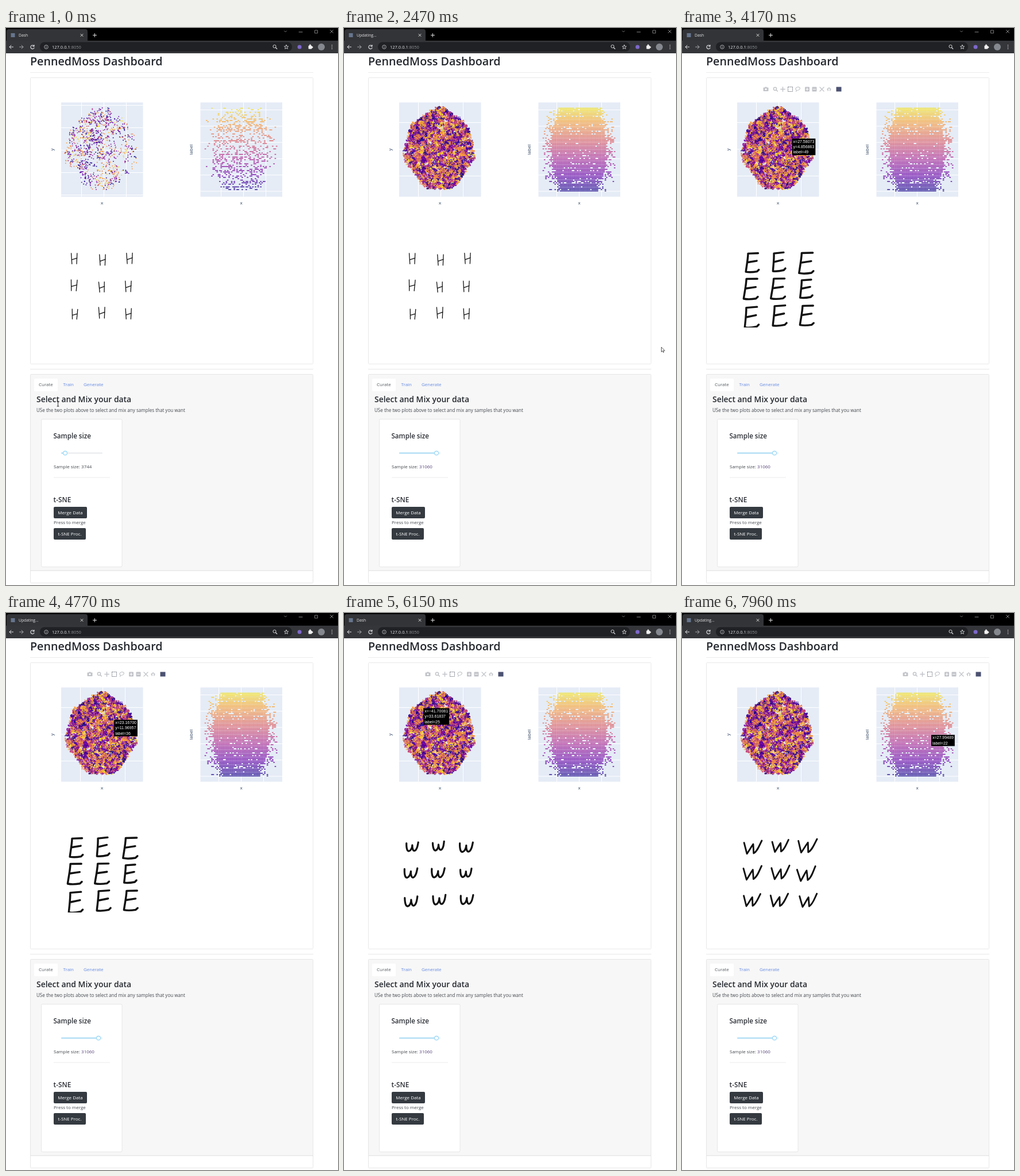
An HTML page with a canvas that plays this animation: 578 px wide and 969 px high, repeating every 8000 ms.

```html
<!DOCTYPE html>
<html lang="en">
<head>
<meta charset="utf-8">
<title>Dashboard</title>
<style>
  html, body { margin: 0; width: 100%; height: 100%; overflow: hidden; background: #fff; }
  canvas { display: block; }
</style>
</head>
<body>
<canvas id="stage" width="578" height="969"></canvas>
<script>
const W = 578, H = 969, LOOP = 8000;
const ctx = document.getElementById('stage').getContext('2d');
const UI = '"Open Sans", "Noto Sans", sans-serif';
const INK = '#30343b', AXIS = '#2a3f5f';

// ---------- helpers ----------
function seeded(seed) {
  return () => {
    seed = (seed + 0x6D2B79F5) | 0;
    let v = Math.imul(seed ^ (seed >>> 15), 1 | seed);
    v = (v + Math.imul(v ^ (v >>> 7), 61 | v)) ^ v;
    return ((v ^ (v >>> 14)) >>> 0) / 4294967296;
  };
}
const mix = (a, b, u) => a + (b - a) * u;
const smooth = u => u * u * (3 - 2 * u);
const latest = (list, t) => list.filter(e => e[0] <= t).pop();

// Values of a keyed track [time, ...values]; `ease` maps the progress between two keys.
function track(keys, t, ease) {
  const next = keys.findIndex(k => k[0] > t);
  if (next < 0) return keys[keys.length - 1].slice(1);
  const a = keys[next - 1], b = keys[next], u = ease((t - a[0]) / (b[0] - a[0]));
  return a.slice(1).map((v, i) => mix(v, b[i + 1], u));
}

const PLASMA = ['0d0887', '6a00a8', 'b12a90', 'e16462', 'fca636', 'f0f921']
  .map(h => [0, 2, 4].map(i => parseInt(h.slice(i, i + 2), 16)));
function plasma(v) {
  const p = Math.min(Math.max(v, 0), 0.9999) * (PLASMA.length - 1), i = Math.floor(p);
  return `rgb(${PLASMA[i].map((c, k) => Math.round(mix(c, PLASMA[i + 1][k], p - i)))})`;
}
function layer(draw) {
  const c = document.createElement('canvas');
  c.width = W; c.height = H;
  draw(c.getContext('2d'));
  return c;
}
function rect(g, x, y, w, h, fill, stroke, r = 0) {
  g.beginPath();
  g.roundRect(x, y, w, h, r);
  if (fill) { g.fillStyle = fill; g.fill(); }
  if (stroke) { g.strokeStyle = stroke; g.lineWidth = 1; g.stroke(); }
}
function disc(g, x, y, r, fill, stroke, width = 1) {
  g.beginPath();
  g.arc(x, y, r, 0, 7);
  if (fill) { g.fillStyle = fill; g.fill(); }
  if (stroke) { g.strokeStyle = stroke; g.lineWidth = width; g.stroke(); }
}
function path(g, d, x, y, color, width = 1, fill) {
  const shape = new Path2D(d);
  g.save();
  g.translate(x, y);
  g.lineCap = g.lineJoin = 'round';
  if (fill) { g.fillStyle = fill; g.fill(shape); }
  g.strokeStyle = color;
  g.lineWidth = width;
  g.stroke(shape);
  g.restore();
}
function text(g, str, x, y, size, color = INK, weight = 400, align = 'left') {
  g.font = `${weight} ${size}px ${UI}`;
  g.textAlign = align;
  g.fillStyle = color;
  g.fillText(str, x, y);
  return x + g.measureText(str).width;
}
function verticalText(g, str, x, y) {
  g.save();
  g.translate(x, y);
  g.rotate(-Math.PI / 2);
  text(g, str, 0, 0, 8, AXIS, 400, 'center');
  g.restore();
}
function button(g, label, y, w) {
  rect(g, 83, y, w, 20, '#343a40', null, 2);
  text(g, label, 83 + w / 2, y + 13, 8, '#fff', 400, 'center');
}

// ---------- static page ----------
function drawBrowser(g) {
  rect(g, 0, 0, W, 23, '#000');
  rect(g, 1, 2, 141, 24, '#333437', null, 4);
  rect(g, 0, 22, W, 22, '#35363a');
  rect(g, 59, 24.5, 439, 16.5, '#202124', null, 8);
  rect(g, 8.5, 9, 7, 7, '#66758c');
  path(g, 'M-2,-2L2,2M2,-2L-2,2', 132, 12.5, '#ddd');
  path(g, 'M-3,0H3M0,-3V3', 154.5, 12.5, '#ddd');
  path(g, 'M-2,-1L0,1L2,-1', 486.5, 6, '#777');
  path(g, 'M-3,0H3', 513, 7, '#888');
  rect(g, 537.5, 4, 5, 5, null, '#777');
  path(g, 'M-2.5,-2.5L2.5,2.5M2.5,-2.5L-2.5,2.5', 567, 6, '#888');
  path(g, 'M3.5,0H-3M0,-3L-3,0L0,3', 9, 33, '#e4e5e7');
  path(g, 'M-3.5,0H3M0,-3L3,0L0,3', 27, 33, '#a5a6a9');
  path(g, 'M2.5,-2A3.2,3.2 0 1 0 3,1.5M3,-3.5V-1H.5', 46, 33, '#e4e5e7', 1.1);
  disc(g, 70, 33, 3.3, null, '#b4b7bb', .9);
  path(g, 'M0,0V1.5M0,-1.6V-1.5', 70, 33, '#b4b7bb', .9);
  const hostEnd = text(g, '127.0.0.1', 80, 35.8, 7.5, '#e8eaed');
  text(g, ':8050', hostEnd, 35.8, 7.5, '#8f9398');
  disc(g, 467.5, 32, 2.6, null, '#d2d3d5');
  path(g, 'M0,0L2,2', 469.7, 34.2, '#d2d3d5', 1.3);
  path(g, 'M0,-3.6L1,-1.2L3.6,-1L1.6,.7L2.3,3.3L0,1.9L-2.3,3.3L-1.6,.7L-3.6,-1L-1,-1.2Z', 488, 33, '#d2d3d5', .9);
  disc(g, 511, 33, 3.5, '#7d68c9');
  rect(g, 526.5, 30.5, 6, 6, '#f1f1f1', null, 1);
  disc(g, 529.5, 30, 1.4, '#f1f1f1');
  disc(g, 533, 33.5, 1.4, '#f1f1f1');
  disc(g, 549, 33, 6, '#85898f');
  [-3, 0, 3].forEach(d => disc(g, 567.5, 33 + d, .8, '#dcdcdc'));
}

function drawPage(g) {
  rect(g, 0, 0, W, H, '#fff');
  drawBrowser(g);
  text(g, 'PennedMoss Dashboard', 42, 65, 19.7, '#24282e', 600);
  rect(g, 42, 77, 493, 1, '#ececec');
  rect(g, 42.5, 86.5, 492, 498, '#fff', '#e9e9e9', 1);
  rect(g, 42, 593, 493, 1, '#e8e8e8');

  rect(g, 42.5, 602.5, 492, 363, '#fff', '#e6e6e6', 1);
  rect(g, 43, 603, 491, 341, '#f7f7f7');
  rect(g, 43, 943.5, 491, 1, '#dedede');
  rect(g, 49, 610, 41, 22, '#fff', null, 2);
  text(g, 'Curate', 57, 623.3, 8, '#555b62');
  text(g, 'Train', 99.5, 623.3, 8, '#6389e2');
  text(g, 'Generate', 135, 623.3, 8, '#6389e2');
  text(g, 'Select and Mix your data', 53, 651, 13.9, '#24282e', 600);
  text(g, 'USe the two plots above to select and mix any samples that you want', 53, 668, 8.05, '#43484e');

  rect(g, 61.5, 680.5, 140.5, 257, '#fff', '#e6e6e6', 2);
  text(g, 'Sample size', 82.5, 714, 11.6, '#2a2e34', 600);
  rect(g, 83, 781.5, 98, 1, '#ececec');
  text(g, 't-SNE', 82.5, 824.5, 11.8, '#2a2e34', 600);
  button(g, 'Merge Data', 833, 58);
  text(g, 'Press to merge', 83, 862.8, 8, '#43484e');
  button(g, 't-SNE Proc.', 870, 56);

  text(g, 'x', 167, 306.5, 8, AXIS, 400, 'center');
  text(g, 'x', 409.5, 306.5, 8, AXIS, 400, 'center');
  verticalText(g, 'y', 83, 211.5);
  verticalText(g, 'label', 325, 211.5);
}

// ---------- plots ----------
function plotArea(g, x, column, row, pitch) {
  rect(g, x, 129.5, 142.5, 164, '#e5ecf6');
  for (let c = column; c < x + 142; c += 39) rect(g, c, 129.5, 1, 164, '#fff');
  for (let r = row; r < 293; r += pitch) rect(g, x, r, 142.5, 1, '#fff');
}
function blobPoint(rnd) {
  const a = rnd() * Math.PI * 2, c = Math.cos(a), s = Math.sin(a);
  const edge = (Math.abs(c) ** 1.7 + Math.abs(s) ** 1.7) ** (-1 / 1.7);
  const r = Math.sqrt(rnd()) * edge * (1 + .04 * Math.sin(7 * a));
  return [166 + r * 61 * c, 211 + r * 71 * s];
}
function randomShade(rnd) {
  const u = rnd();
  if (u < .43) return rnd() * .36;
  if (u < .56) return .4 + rnd() * .22;
  return u < .87 ? .66 + rnd() * .14 : .84 + rnd() * .12;
}
function drawEmbedding(g, dense) {
  const rnd = seeded(dense ? 91 : 17);
  const clusters = dense ? 2300 : 430, size = dense ? 7 : 3, spread = dense ? 5 : 9;
  for (let i = 0; i < clusters; i++) {
    const [x, y] = blobPoint(rnd);
    const inBand = Math.abs(x - 210 + y * .28) < 14;
    if (!dense && !inBand && x > 165 && rnd() < .35) continue;
    const shade = !dense && inBand && rnd() < .6 ? rnd() * .3 : randomShade(rnd);
    g.fillStyle = plasma(shade);
    for (let k = 0; k < size; k++) {
      g.beginPath();
      g.arc(x + (rnd() - .5) * spread, y + (rnd() - .5) * spread, 1, 0, 7);
      g.fill();
    }
  }
}
function drawLabels(g, dense) {
  const rnd = seeded(dense ? 5 : 23), rows = 62;
  for (let i = 0; i < rows; i++) {
    const y = 283.5 - i * 2.36, weight = rnd();
    const core = 27 + 18 * Math.sin(i / rows * Math.PI) + rnd() * 7;
    g.fillStyle = plasma(.03 + i / rows * .93);
    for (let x = 347; x < 473; x += 2.3) {
      const away = Math.abs(x - 409) / core;
      const full = away < 1 ? .72 + weight * .6 : .75 * (1.55 - away);
      const few = (away < 1 ? .45 : .22 * (1.6 - away)) * (.2 + weight);
      if (rnd() < (dense ? full : few)) g.fillRect(x - 1.3, y - .75, 2.6, 1.5);
    }
  }
}
const plots = [false, true].map(dense => layer(g => {
  plotArea(g, 96, dense ? 129 : 131, dense ? 164 : 134, dense ? 46.5 : 39);
  plotArea(g, 338.5, dense ? 370 : 374, 142, 28.3);
  g.globalAlpha = .88;
  drawEmbedding(g, dense);
  drawLabels(g, dense);
}));
const page = layer(drawPage);

// ---------- handwriting samples: one stroke shape on a jittered 3 by 3 grid ----------
const GLYPHS = {
  bar: { shapes: ['M-5,-9L-4,9M5,-9L4,9M-4,2L5,-1'], width: 1.3, x: 119, y: 402 },
  comb: { shapes: ['M10,-16L-7,-15C-7,-5 -9,6 -10,16C-4,17 4,16 9,15L12,12M-8,0L8,-3'], width: 3.4, x: 121, y: 407 },
  bow: { shapes: ['M-12,-15L-14,16M-17,-15C2,-22 19,-14 18,-3C17,11 2,19 -14,16'], width: 3.5, x: 122, y: 404 },
  wave: { shapes: ['M-10,-6C-10,4 -8,8 -5,7C-2,6 0,1 0,-3C0,4 2,8 5,6C9,3 9,-3 10,-8'], width: 3.2, x: 118, y: 406 },
  stem: { shapes: ['M0,-2L-.5,10M.5,-9.5V-9', 'M0,-4C-3,4 -3,10 -1,9C2,8 3,4 3,2M-4,2L2,1M2,-10V-9.5'],
    width: 3.4, x: 121, y: 400 },
  zigzag: { shapes: ['M-14,-8L-9,10C-5,4 -2,-2 1,-6L2,9C8,6 11,-4 15,-12'], width: 2.9, x: 123, y: 407 }
};
function drawGlyphs(name) {
  const { shapes, width, x, y } = GLYPHS[name], rnd = seeded(name.length * 7);
  const jitter = size => (rnd() - .5) * size;
  ctx.save();
  ctx.beginPath();
  ctx.rect(96, 379, 142.5, 142);
  ctx.clip();
  ctx.strokeStyle = '#111';
  ctx.lineCap = ctx.lineJoin = 'round';
  for (let i = 0; i < 9; i++) {
    const row = Math.floor(i / 3), col = i % 3, scale = 1.04 + jitter(.2);
    ctx.save();
    ctx.translate(x + col * 47.5 + jitter(4), y + row * 47.3 + jitter(4));
    ctx.rotate(jitter(.1));
    ctx.scale(scale, scale);
    ctx.lineWidth = width / scale;
    ctx.stroke(new Path2D(shapes[Math.min(row, shapes.length - 1)]));
    ctx.restore();
  }
  ctx.restore();
}

// ---------- hover tools ----------
function drawModebar(x) {
  const y = 106.5, c = '#c2c4c9';
  rect(ctx, x, y - 3, 9, 6.5, c, null, 1);
  rect(ctx, x + 3, y - 4, 3, 2, c);
  disc(ctx, x + 4.5, y, 1.6, '#fff');
  disc(ctx, x + 20.5, y - .7, 2.6, null, c, 1.5);
  path(ctx, 'M0,0L2,2', x + 22.8, y + 1.5, c, 1.6);
  path(ctx, 'M-3.7,0H3.7M0,-3.7V3.7', x + 34, y, c, 1.5);
  ctx.setLineDash([2, 1]);
  rect(ctx, x + 43, y - 4, 8, 8, null, '#777b84');
  ctx.setLineDash([]);
  path(ctx, 'M-2,2C-6,-1 -2,-4 1,-4C6,-3 4,2 -2,2L-3,4', x + 60, y, c, 1.2);
  ['M-2,0H2M0,-2V2', 'M-2,0H2'].forEach((sign, i) => {
    rect(ctx, x + 72.5 + i * 12.5, y - 4, 8, 8, c, null, 1);
    path(ctx, sign, x + 76.5 + i * 12.5, y, '#fff', 1.2);
  });
  path(ctx, 'M-3.5,-3.5L3.5,3.5M3.5,-3.5L-3.5,3.5', x + 102, y, c, 1.3);
  path(ctx, 'M-3,0L0,-2.5L3,0M-1.8,.5V2.5M1.8,.5V2.5', x + 114.5, y, c, 1.6);
  rect(ctx, x + 127, y - 4, 9, 8, '#4c5270');
}
function drawTooltip(px, py, values) {
  const lines = Object.entries(values).map(([k, v]) => `${k}=${v}`.replace('-', '\u2212'));
  ctx.font = '7px "Liberation Sans", Arial, sans-serif';
  ctx.textAlign = 'left';
  const width = Math.max(...lines.map(s => ctx.measureText(s).width)) + 4;
  const height = lines.length * 9.2 + 1.2, top = py - height / 2;
  ctx.fillStyle = '#000';
  ctx.fillRect(px + 2, top, width, height);
  ctx.fillStyle = '#fff';
  lines.forEach((s, i) => ctx.fillText(s, px + 4, top + 7.5 + i * 9.2));
}
// Hovered data points: time, x, y, label. The tooltip jumps from sample to sample between them.
const LEFT_HOVER = [[3420, 46.31752, 2.174093, 36], [4170, 27.58073, 4.856863, 49], [5260, 20.96014, 15.52592, 29],
  [6150, -41.70081, 33.61837, 25], [6920, 12.38921, -11.92268, 50]];
const RIGHT_HOVER = [[7270, 11.62047, 21], [7800, 27.99489, 22]];
const jumps = u => Math.round(u * 3) / 3;

function drawHover(t) {
  if (t >= 3420 && t < 6990) {
    const [x, y, label] = track(LEFT_HOVER, t, jumps);
    drawTooltip(168.3 + .77 * x, 211.3 - .93 * y,
      { x: x.toPrecision(7), y: y.toPrecision(7), label: Math.round(label) });
  } else if (t >= 7270) {
    const [x, label] = track(RIGHT_HOVER, t, jumps);
    drawTooltip(408.5 + .84 * x, 221.7, { x: x.toPrecision(7), label: Math.round(label) });
  }
}

// ---------- pointer: time, x, y ----------
const POINTER = [[0, 90.5, 654], [70, 90.5, 654], [420, 103, 739], [500, 103, 739], [840, 161, 739], [980, 161, 737],
  [1810, 552.5, 555.5], [3000, 552.5, 555.5], [3420, 214, 211], [6850, 205, 219], [6920, 258, 217], [7270, 418, 222]];
function drawPointer(t) {
  if (t >= 7270 || (t >= 3420 && t < 6850)) return;
  const [x, y] = track(POINTER, t, smooth);
  if (t < 140) path(ctx, 'M-1.5,-4H1.5M0,-4V4M-1.5,4H1.5', x, y, '#333');
  else if (t >= 6850) path(ctx, 'M-4.5,0H4.5M0,-4.5V4.5', x, y, '#111', 1.2);
  else path(ctx, 'M0,0V8L2,6.3L3.3,9L4.5,8.4L3.2,5.8H5.6Z', x, y, '#333', .8, '#fff');
}

// ---------- timeline ----------
const SAMPLES = [[0, 'bar'], [3640, 'comb'], [4910, 'bow'], [5800, 'wave'], [6620, 'stem'], [7540, 'zigzag']];

function isUpdating(t) {
  const loading = t >= 1050 && t < 2600;
  const fetching = t >= 4600 && (t - 4600) % 560 < 280;
  return loading || fetching;
}
function render(t) {
  const full = t >= 2470;
  ctx.drawImage(page, 0, 0);
  ctx.drawImage(plots[+full], 0, 0);
  text(ctx, isUpdating(t) ? 'Updating...' : 'Dash', 22, 15, 6.8, '#e4e5e7');

  const knob = t < 500 ? 103 : t < 840 ? track(POINTER, t, smooth)[0] : 161;
  rect(ctx, 96, 738.5, 72, 2, '#e7e9eb', null, 1);
  rect(ctx, 96, 738.5, knob - 96, 2, '#a9def7', null, 1);
  disc(ctx, knob, 739.5, 3.4, '#fff', '#90d5f7', 1.1);
  const countX = text(ctx, 'Sample size: ', 83, 765.8, 8, '#43484e');
  text(ctx, full ? '31060' : '3744', countX, 765.8, 8, full ? '#56437a' : '#43484e');

  drawGlyphs(latest(SAMPLES, t)[1]);
  if (t >= 3350) drawModebar(t < 7130 ? 141.5 : 384.5);
  drawHover(t);
  drawPointer(t);
}

const start = performance.now();
function tick() {
  render((performance.now() - start) % LOOP);
  requestAnimationFrame(tick);
}
tick();
</script>
</body>
</html>
```
